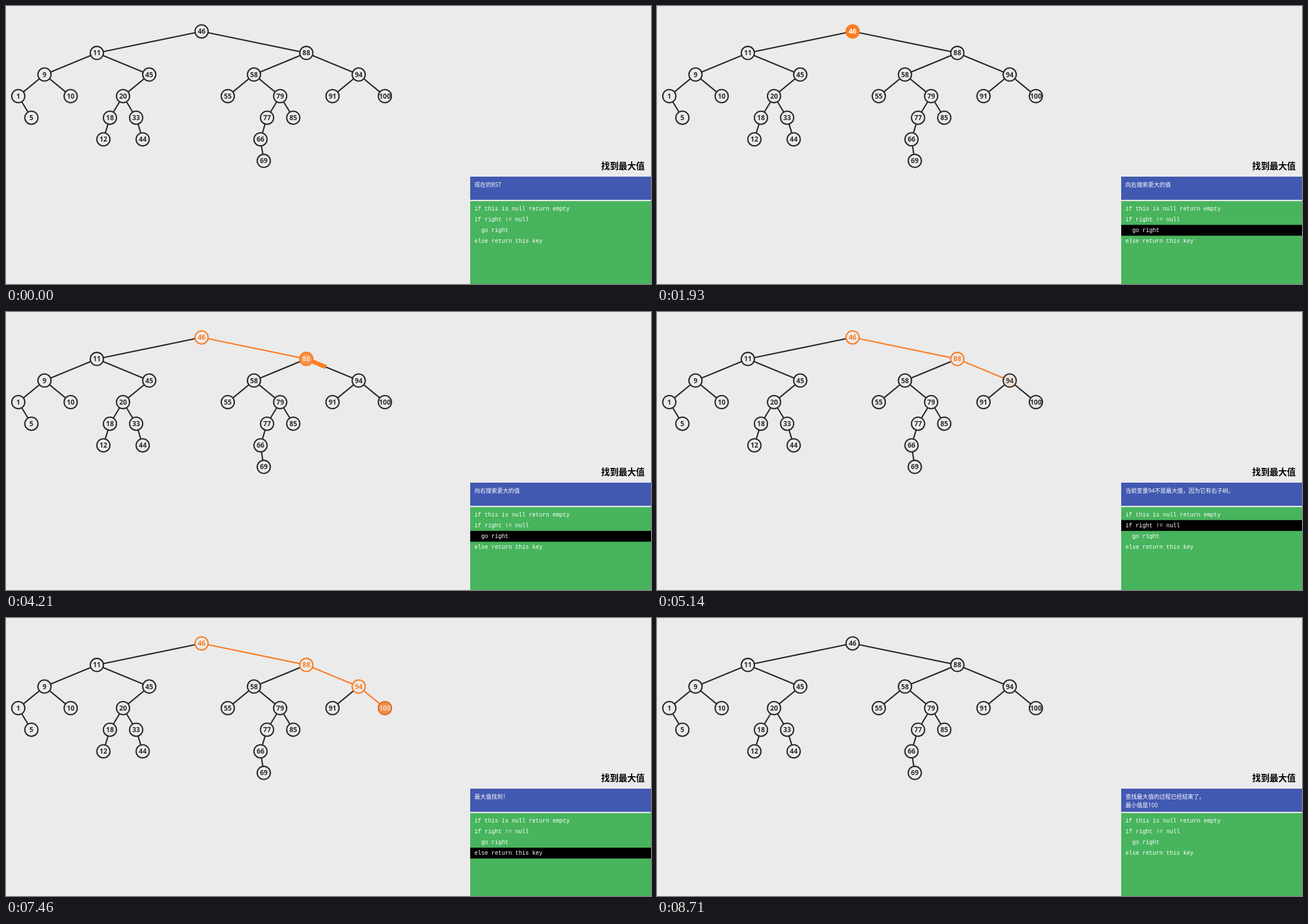
Write an HTML page that moves like this. It is 1138x492 px and loops after 8.74 s.

```html
<!DOCTYPE html>
<html lang="zh-CN">
<head>
<meta charset="utf-8">
<style>
  html, body { margin: 0; width: 100%; height: 100%; overflow: hidden; background: #ebebeb; }
  svg { display: block; width: 1138px; height: 492px; }
  .num { font: 700 12px "Open Sans", "Noto Sans", sans-serif; text-anchor: middle; }
  .title { font: 700 15.4px "Noto Sans CJK SC", "Noto Sans CJK", sans-serif; text-anchor: end; }
  .status { font: 500 10px "Open Sans", "Noto Sans CJK SC", "Noto Sans CJK", sans-serif; fill: #fff; }
  .code { font: 10px "Liberation Mono", monospace; fill: #fff; white-space: pre; }
</style>
</head>
<body>
<svg id="stage" viewBox="0 0 1138 492"></svg>
<script>
const LOOP = 8740, START = 895, STEP = 1000, FADE = 860, GROW = 720;
const BG = [235, 235, 235], DARK = [43, 43, 43], ORANGE = [252, 125, 34], WHITE = [255, 255, 255];
const STYLES = {
  plain: { fill: BG, stroke: DARK, text: DARK },
  hot: { fill: ORANGE, stroke: ORANGE, text: WHITE },
  done: { fill: BG, stroke: ORANGE, text: ORANGE }
};
const KEYS = [46, 11, 88, 9, 45, 58, 94, 1, 10, 20, 55, 79, 91, 100, 5, 18, 33, 77, 85, 12, 44, 66, 69];
const PATH = [46, 88, 94, 100];
const LAST = 8;
const CODE = ["if this is null return empty", "if right != null", "  go right", "else return this key"];

const stage = document.getElementById("stage");

function add(tag, attrs, text) {
  const el = document.createElementNS("http://www.w3.org/2000/svg", tag);
  for (const name in attrs) el.setAttribute(name, attrs[name]);
  if (text !== undefined) el.textContent = text;
  stage.appendChild(el);
  return el;
}

const clamp = v => Math.max(0, Math.min(1, v));
const ease = x => x < 0.5 ? 4 * x ** 3 : 1 - 4 * (1 - x) ** 3;
const mix = (a, b, p) => `rgb(${a.map((v, i) => Math.round(v + (b[i] - v) * p))})`;

// Each level halves the horizontal distance to the parent.
const nodes = new Map();
function insert(key) {
  let node = nodes.get(KEYS[0]), parent = null, side = "";
  while (node) {
    parent = node;
    side = key < node.key ? "left" : "right";
    node = node[side];
  }
  const fresh = { key, parent, x: 345.1, y: 44.9, reach: 184.8 };
  if (parent) {
    parent[side] = fresh;
    fresh.x = parent.x + (side === "left" ? -1 : 1) * parent.reach;
    fresh.y = parent.y + 38.2;
    fresh.reach = parent.reach / 2;
  }
  nodes.set(key, fresh);
}
KEYS.forEach(insert);

for (const n of nodes.values()) {
  if (!n.parent) continue;
  n.edge = add("line", {
    x1: n.parent.x, y1: n.parent.y, x2: n.x, y2: n.y,
    stroke: mix(DARK, DARK, 0), "stroke-width": 2.4
  });
}
const beam = add("line", { stroke: mix(ORANGE, ORANGE, 0), "stroke-width": 7.4 });
for (const n of nodes.values()) {
  n.disc = add("circle", { cx: n.x, cy: n.y, r: 11.6, "stroke-width": 2.3 });
  n.label = add("text", { x: n.x, y: n.y + 4.3, class: "num" }, n.key);
  paint(n, "plain", "plain", 1);
}

add("text", { x: 1127, y: 288.5, class: "title" }, "找到最大值");
add("rect", { x: 819, y: 302, width: 319, height: 41, fill: "#4159b1" });
add("rect", { x: 819, y: 345.3, width: 319, height: 147, fill: "#48b45d" });
const bar = add("rect", { x: 819, width: 319, height: 19.1, fill: "#000" });
const status = [320.3, 334.7].map(y => add("text", { x: 826.5, y, class: "status" }));
CODE.forEach((line, i) => add("text", { x: 826.5, y: 361.5 + i * 19.1, class: "code" }, line));

function paint(n, from, to, p) {
  const a = STYLES[from], b = STYLES[to];
  n.disc.setAttribute("fill", mix(a.fill, b.fill, p));
  n.disc.setAttribute("stroke", mix(a.stroke, b.stroke, p));
  n.label.setAttribute("fill", mix(a.text, b.text, p));
}

function styleAt(i, step) {
  const visit = 2 * i + 1;
  if (step >= LAST || step < visit) return "plain";
  return step === visit ? "hot" : "done";
}

function message(step) {
  if (step === 0) return ["现在的BST"];
  if (step === LAST) return ["查找最大值的过程已经结束了。", "最小值是100"];
  if (step === LAST - 1) return ["最大值找到！"];
  if (step % 2 === 0) return ["向右搜索更大的值"];
  return [`当前变量${PATH[(step - 1) / 2]}不是最大值，因为它有右子树。`];
}

function rowAt(step) {
  if (step === 0 || step === LAST) return -1;
  if (step === LAST - 1) return 3;
  return step % 2 ? 1 : 2;
}

function drawBeam(n, p) {
  const a = n.parent, dx = n.x - a.x, dy = n.y - a.y;
  const rim = 12 / Math.hypot(dx, dy);
  const tip = rim + (1 - 2 * rim) * p;
  const ends = { x1: a.x + dx * rim, y1: a.y + dy * rim, x2: a.x + dx * tip, y2: a.y + dy * tip };
  for (const name in ends) beam.setAttribute(name, ends[name]);
  beam.setAttribute("visibility", "visible");
}

let shown = -1;
function showStep(step) {
  if (step === shown) return;
  shown = step;
  const lines = message(step), row = rowAt(step);
  status.forEach((el, i) => el.textContent = lines[i] || "");
  bar.setAttribute("visibility", row < 0 ? "hidden" : "visible");
  bar.setAttribute("y", 349.2 + row * 19.1);
}

function draw(t) {
  const step = t < START ? 0 : Math.min(LAST, 1 + Math.floor((t - START) / STEP));
  const age = t - START - (step - 1) * STEP;
  const p = step ? ease(clamp(age / FADE)) : 1;
  const grown = ease(clamp(age / GROW));
  showStep(step);
  beam.setAttribute("visibility", "hidden");

  PATH.forEach((key, i) => {
    const n = nodes.get(key);
    paint(n, styleAt(i, Math.max(0, step - 1)), styleAt(i, step), p);
    if (!i) return;
    const growing = step === 2 * i && grown < 1;
    let lit = step >= 2 * i && !growing ? 1 : 0;
    if (step === LAST) lit = 1 - p;
    n.edge.setAttribute("stroke", mix(DARK, ORANGE, lit));
    if (growing) drawBeam(n, grown);
  });
}

const begin = performance.now();
function tick() {
  draw((performance.now() - begin) % LOOP);
  requestAnimationFrame(tick);
}
draw(0);
requestAnimationFrame(tick);
</script>
</body>
</html>
```
